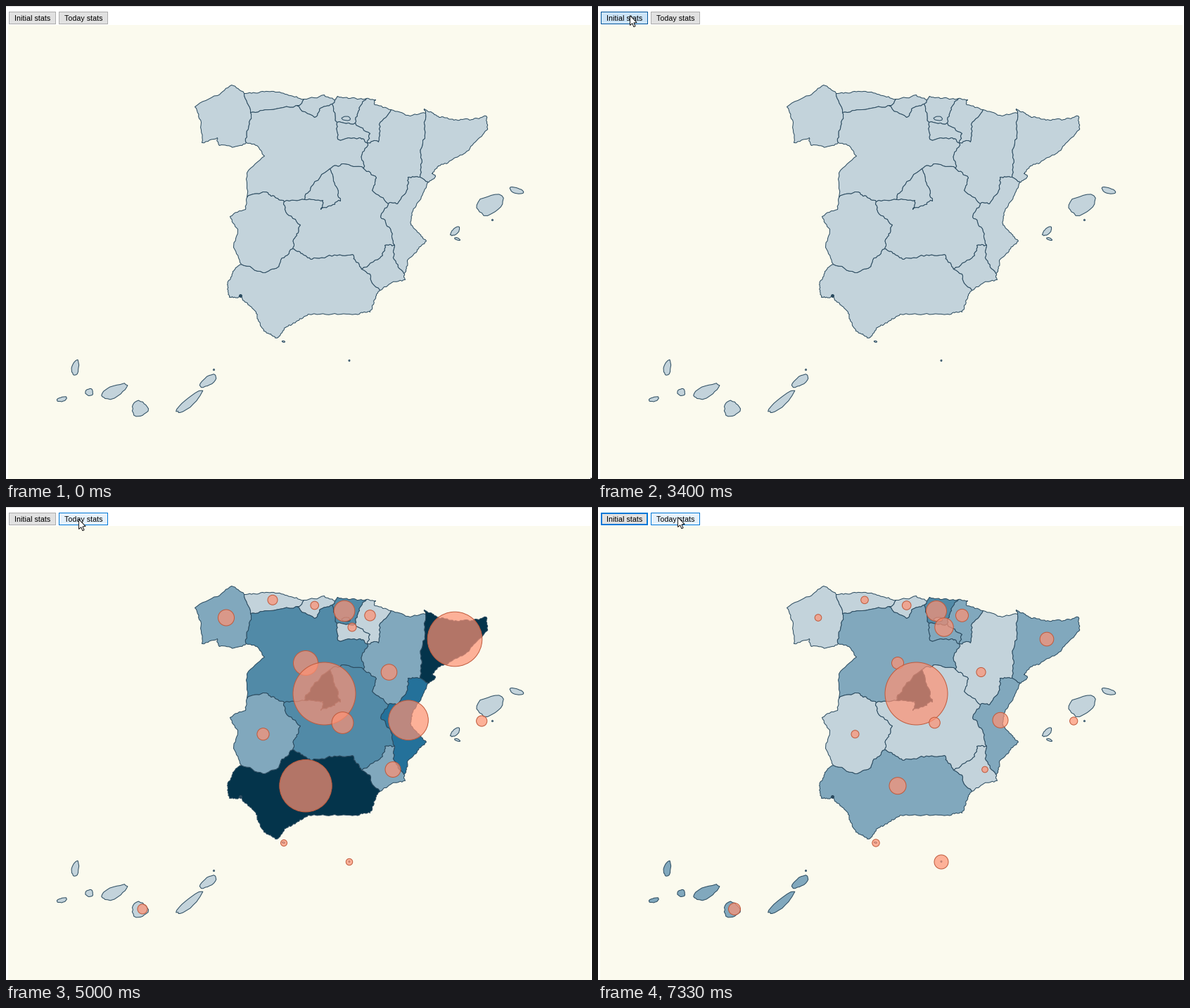
These frames come from a looping animation (833x673 px, 8 s). A matplotlib script:

```python
import numpy as np
import matplotlib.pyplot as plt
from matplotlib.animation import FuncAnimation
from matplotlib.patches import Circle, Polygon, Rectangle

W, H, DPI = 833, 673, 64
PX = 72 / DPI
STEP, LOOP = 40, 8000

SEA, EDGE = "#fbfaee", "#2a4a5f"
LEVELS = ["#c3d3db", "#81a8bd", "#518aa7", "#24719a", "#04344b"]
LIMITS = [8.2, 14, 20, 35]  # bubble radius at which the next level starts

# Points where three areas, or two areas and the sea, meet.
NODES = {
    "A": (338, 124), "B": (347, 151), "C": (341, 194), "D": (423, 132),
    "E": (412, 141), "F": (467, 133), "G": (463, 139), "H": (470, 165),
    "I": (512, 131), "J": (496, 166), "K": (547, 147), "L": (513, 194),
    "N": (596, 152), "O": (588, 243), "P": (600, 250), "Q": (508, 231),
    "R": (460, 231), "S": (424, 275), "T": (463, 283), "U": (395, 278),
    "V": (342, 272), "W": (334, 367), "X": (407, 345), "Y": (505, 374),
    "Z": (552, 340), "a": (543, 281), "b": (565, 380), "c": (531, 404),
}
# Main bends between two nodes; pairs not listed run straight.
COAST = {
    "AC": [(320, 112), (300, 127), (268, 143), (277, 165), (278, 194),
           (300, 187), (303, 198), (324, 200)],
    "AD": [(380, 121)],
    "DF": [(452, 126)],
    "FI": [(471, 128)],
    "IK": [(525, 133), (524, 140)],
    "KN": [(571, 155)],
    "NP": [(594, 146), (617, 158), (648, 161), (682, 156), (683, 176),
           (650, 210), (614, 227), (605, 238), (610, 242)],
    "Pb": [(578, 291), (575, 311), (597, 334), (572, 359)],
    "bc": [(567, 389), (548, 393)],
    "Wc": [(322, 377), (314, 396), (317, 414), (333, 413), (355, 435),
           (366, 462), (385, 472), (398, 456), (429, 438), (496, 438),
           (517, 435), (525, 413)],
    "VW": [(340, 289), (318, 299), (329, 317), (323, 343)],
    "CV": [(356, 198), (367, 213), (342, 237)],
}
INLAND = {
    "BE": [(375, 147)],
    "DE": [(420, 138)],
    "EG": [(438, 158), (445, 146)],
    "IJ": [(502, 147)],
    "KL": [(530, 168), (529, 193)],
    "JL": [(517, 181)],
    "HL": [(471, 189), (502, 187)],
    "LQ": [(505, 217)],
    "RQ": [(479, 224)],
    "RS": [(433, 257)],
    "ST": [(450, 276), (447, 289)],
    "TR": [(475, 277)],
    "VU": [(365, 264), (381, 270)],
    "WX": [(365, 379), (386, 371), (390, 361)],
    "UX": [(397, 292), (418, 311), (411, 328)],
    "XY": [(434, 360), (492, 353)],
    "Qa": [(526, 244), (520, 262)],
    "aO": [(556, 281), (569, 262), (571, 243)],
    "NO": [(595, 188), (589, 215)],
    "aZ": [(532, 300), (544, 314)],
    "YZ": [(531, 358), (538, 340)],
    "Zb": [(551, 360)],
    "Yc": [(517, 381), (520, 394)],
}
# Each area is a walk round its nodes.
AREAS = {
    "gal": "ACB", "ast": "ADEB", "can": "DFGE", "pv": "FIJHG", "nav": "IKLJ",
    "rio": "HJL", "cyl": "CVUSRQLHGEB", "ara": "KNOaQL", "cat": "NPO",
    "val": "PbZaO", "mur": "bcYZ", "and": "WcYX", "ext": "VWXU",
    "clm": "RQaZYXUST", "mad": "RST",
}
# Centre, half length, half width and tilt in degrees.
ISLES = {
    "bal": [(687, 282, 20, 13, -25), (725, 262, 10, 4, 15),
            (638, 320, 8, 4, -45), (641, 331, 4, 1.5, 20),
            (691, 304, 1, 1, 0)],
    "cny": [(98, 514, 11, 5, 100), (79, 559, 7, 3, -15),
            (118, 549, 5.5, 5, 0), (153, 548, 20, 8, -24),
            (189.5, 572.5, 11, 11, 0), (260, 563, 23, 6, -40),
            (287, 533, 13, 6, -35), (295, 517, 1, 1, 0)],
    "ceu": [(394, 477, 2, 1, 10)],
    "mel": [(487.5, 504, 1, 1, 0)],
    "cyl": [(483, 159.5, 6, 3, 5)],
}
# Bubble centre and its radius in each of the two data sets.
STATS = {
    "gal": (313, 157.5, 4.8, 11.5), "ast": (379, 132.3, 5.3, 7),
    "can": (438.7, 140, 6.3, 5.8), "pv": (481, 148, 14.5, 14.8),
    "nav": (517.5, 154.3, 9, 7.7), "rio": (492, 171, 13.2, 6),
    "cyl": (426, 222, 8.5, 17.5), "mad": (452.5, 265.5, 44.5, 44.5),
    "clm": (478.5, 307, 7.8, 15.4), "ara": (544.5, 235, 6.6, 11.3),
    "cat": (638, 188, 9.8, 38.8), "val": (572, 303.3, 11, 28.3),
    "mur": (550, 373.5, 4.3, 11), "and": (426, 396.7, 12, 37.2),
    "ext": (365.5, 323.2, 5.5, 8.6), "bal": (676.2, 304.5, 5.6, 7.6),
    "cny": (194, 572, 8.5, 7), "ceu": (395, 478, 5.2, 4.5),
    "mel": (488, 505, 10, 4.7),
}

# Time, x, y of the pointer; it moves evenly in between.
MOUSE = np.array([
    (60, 831, 671), (560, 826, 651), (670, 835, 651), (869, 835, 651),
    (870, 813, 640), (1760, 349, 476), (2530, 76, 51), (2930, 45, 13),
    (4090, 45, 13), (4150, 56, 13), (4560, 103, 17), (5400, 103, 17),
    (5700, 42, 21), (6670, 42, 21), (7350, 113, 14)])
ARROW = np.array([(0, 0), (0, 14), (3.2, 11.2), (5.4, 16.2), (7.6, 15.2),
                  (5.4, 10.4), (9.6, 10)])
# Press time, release time, button index (also the data set shown).
CLICKS = [(3400, 3460, 0), (4860, 5000, 1), (5930, 6060, 0)]
LOOKS = {  # border, fill, border width
    "normal": ("#adadad", "#e1e1e1", 1),
    "focus": ("#0078d7", "#e1e1e1", 2),
    "hover": ("#0078d7", "#e5f1fb", 1),
    "press": ("#005499", "#cce4f7", 1),
}

rng = np.random.default_rng(4)


def rough(pts, amp):
    """Break up a polyline by midpoint displacement, at most amp pixels."""
    pts = np.array(pts, float)
    while True:
        d = np.diff(pts, axis=0)
        size = np.hypot(*d.T)
        if size.max() < 5:
            return pts
        shift = rng.uniform(-1, 1, len(d)) * np.minimum(0.25, amp / size)
        mid = pts[:-1] + d / 2 + np.c_[-d[:, 1], d[:, 0]] * shift[:, None]
        out = np.empty((2 * len(pts) - 1, 2))
        out[::2], out[1::2] = pts, mid
        pts = out


def border(pair):
    """Shared line between two nodes, built once for both neighbours."""
    if pair[::-1] in lines:
        return lines[pair[::-1]][::-1]
    if pair not in lines:
        for key in (pair, pair[::-1]):
            if key in COAST or key in INLAND:
                break
        amp = 1.2 if key in COAST else 1.7
        bends = COAST.get(key) or INLAND.get(key, [])
        lines[key] = rough([NODES[key[0]], *bends, NODES[key[1]]], amp)
        return border(pair)
    return lines[pair]


def ring(walk):
    return np.vstack([border(p + q)[:-1]
                      for p, q in zip(walk, walk[1:] + walk[0])])


def blob(cx, cy, a, b, tilt):
    """Ellipse with a slightly uneven outline."""
    u = np.linspace(0, 2 * np.pi, 22, endpoint=False)
    r = 1 + 0.08 * np.sin(3 * u + cx) + rng.uniform(-0.08, 0.08, u.size)
    x, y = a * r * np.cos(u), b * r * np.sin(u)
    c, s = np.cos(np.radians(tilt)), np.sin(np.radians(tilt))
    return np.c_[cx + x * c - y * s, cy + x * s + y * c]


def land(pts):
    return ax.add_patch(Polygon(pts + 0.5, fc=LEVELS[0], ec=EDGE, lw=PX,
                                joinstyle="round"))


fig = plt.figure(figsize=(W / DPI, H / DPI), dpi=DPI, facecolor="white")
ax = fig.add_axes([0, 0, 1, 1])
ax.set_xlim(0, W)
ax.set_ylim(H, 0)
ax.axis("off")
ax.add_patch(Rectangle((0, 0), W, 1, fc="#dcdcdc", lw=0))
ax.add_patch(Rectangle((3, 27), 828, H - 27, fc=SEA, lw=0))

lines = {}
shapes = {name: [land(ring(walk))] for name, walk in AREAS.items()}
for name, group in ISLES.items():
    shapes.setdefault(name, []).extend(land(blob(*b)) for b in group)
ax.add_patch(Circle((333.5, 412.5), 2.5, fc=EDGE, lw=0))

bubbles = {name: ax.add_patch(Circle((x, y), 1, fc=(1, .573, .455, .7),
                                     ec="#c05a3c", lw=PX, zorder=3))
           for name, (x, y, *_) in STATS.items()}


class Button:
    def __init__(self, x0, x1, label):
        self.box = x0, 8, x1, 26
        self.outer = ax.add_patch(Rectangle((x0, 8), x1 - x0, 18, lw=0,
                                            zorder=4))
        self.inner = ax.add_patch(Rectangle((0, 0), 1, 1, lw=0, zorder=5))
        ax.text(x0 + 8, 21, label, va="baseline", family="Liberation Sans",
                size=10.6 * PX, zorder=6)

    def contains(self, x, y):
        x0, y0, x1, y1 = self.box
        return x0 <= x < x1 and y0 <= y < y1

    def style(self, look):
        edge, face, w = LOOKS[look]
        x0, y0, x1, y1 = self.box
        self.outer.set_facecolor(edge)
        self.inner.set_facecolor(face)
        self.inner.set_bounds(x0 + w, y0 + w, x1 - x0 - 2 * w,
                              y1 - y0 - 2 * w)


buttons = [Button(4, 71, "Initial stats"), Button(75, 145, "Today stats")]
cursor = ax.add_patch(Polygon(ARROW, fc="white", ec="black", lw=PX * 0.9,
                              joinstyle="miter", zorder=9))


def show_data(which):
    for name, (_, _, *radii) in STATS.items():
        r = 0 if which is None else radii[which]
        for p in shapes[name]:
            p.set_facecolor(LEVELS[np.searchsorted(LIMITS, r)])
        bubbles[name].set_visible(r > 0)
        bubbles[name].set_radius(r)


def draw(n):
    t = n * STEP + 30
    x, y = (round(np.interp(t, MOUSE[:, 0], MOUSE[:, k])) for k in (1, 2))
    cursor.set_xy(ARROW + (x + 0.5, y + 0.5))

    data = focus = pressed = None
    for down, up, which in CLICKS:
        if t >= down:
            focus = which
        if down <= t < up:
            pressed = which
        if t >= up:
            data = which
    show_data(data)
    for i, b in enumerate(buttons):
        if i == pressed:
            b.style("press")
        elif b.contains(x, y):
            b.style("hover")
        else:
            b.style("focus" if i == focus else "normal")
    return []


anim = FuncAnimation(fig, draw, frames=LOOP // STEP, interval=STEP,
                     repeat=True, repeat_delay=0, blit=False)
plt.show()
```
